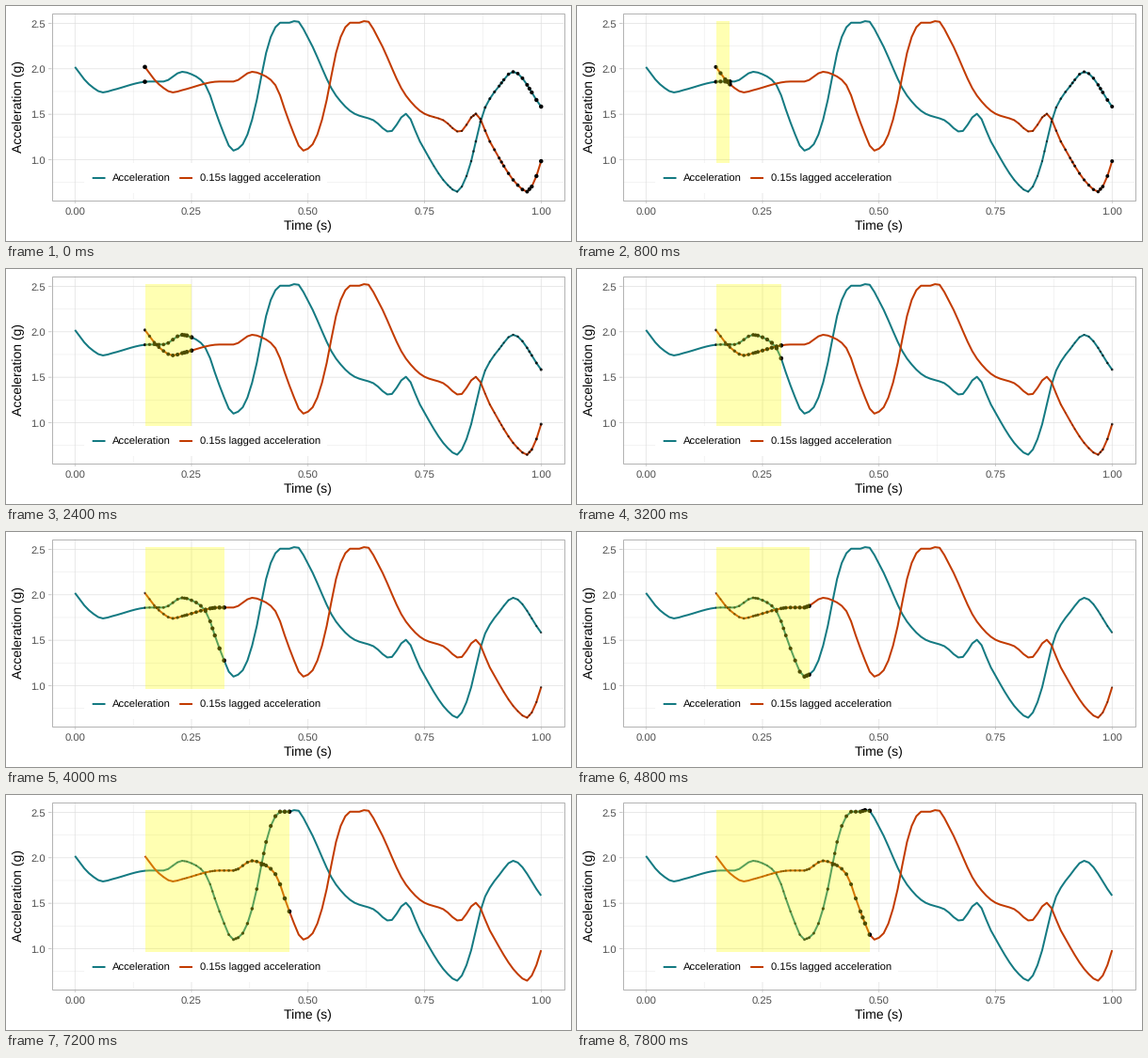
Write a matplotlib script that moves like this. It is 600 by 250 pixels and loops after 8000 ms.

```python
import numpy as np
import matplotlib.pyplot as plt
from matplotlib.animation import FuncAnimation
from matplotlib.patches import Rectangle

W, H, DPI = 600, 250, 100
PX = 72 / DPI
FRAMES, INTERVAL = 40, 200
LAG, WAKE = 0.15, 33
TEAL, ORANGE = "#147a82", "#c23b00"
GRID, EDGE, TICK = "#dedede", "#b3b3b3", "#4d4d4d"
LEFT, RIGHT, TOP, BOTTOM = 48.5, 592.5, 7.5, 206.5

plt.rcParams["font.family"] = "Liberation Sans"
plt.rcParams["text.hinting"] = "none"


def sx(t):
    return 73.25 + 495 * np.asarray(t)


def sy(g):
    return 163.5 - 96.7 * (np.asarray(g) - 1)


# Peaks, dips and bends of the acceleration: hundredths of a second, g
BENDS = [(0, 2.02), (3, 1.83), (6, 1.74), (8, 1.765), (16, 1.86), (19, 1.86),
         (23, 1.967), (26, 1.915), (28, 1.82), (31, 1.41), (34, 1.10),
         (36, 1.17), (38, 1.44), (42, 2.35), (44, 2.507), (46, 2.507),
         (47.5, 2.53), (50, 2.34), (56, 1.705), (60, 1.505), (64, 1.435),
         (67.5, 1.305), (71, 1.505), (74, 1.20), (80, 0.72), (82, 0.648),
         (84, 0.82), (88, 1.575), (91, 1.81), (94, 1.967), (100, 1.584)]


def smooth(x, points):
    """Cubic curve through the points that never overshoots them."""
    px, py = np.array(points).T
    h = np.diff(px)
    d = np.diff(py) / h
    turn = d[:-1] * d[1:] <= 0
    mean = 2 * d[:-1] * d[1:] / np.where(turn, 1, d[:-1] + d[1:])
    m = np.concatenate([d[:1], np.where(turn, 0, mean), d[-1:]])
    i = np.clip(np.searchsorted(px, x, side="right") - 1, 0, len(h) - 1)
    u = (x - px[i]) / h[i]
    ease = u * u * (3 - 2 * u)
    return (py[i] + (py[i + 1] - py[i]) * ease
            + h[i] * u * (1 - u) * (m[i] * (1 - u) - m[i + 1] * u))


time = np.arange(101) / 100
accel = smooth(np.arange(101.0), BENDS)

# Steps at which the head only moves half way to the next sample
HALVES = np.round(3.01 + 6.75 * np.arange(6))


def head(i):
    """Time at the moving head; negative steps are the end of the last pass."""
    if i < 0:
        return 1 + LAG - head(-1 - i)
    return LAG + (i - np.clip((i - HALVES + 1) / 2, 0, 1).sum()) / 100


fig = plt.figure(figsize=(W / DPI, H / DPI), dpi=DPI, facecolor="white")
ax = fig.add_axes([0, 0, 1, 1])
ax.set_xlim(0, W)
ax.set_ylim(H, 0)
ax.axis("off")


def line(x, y, color, width, z):
    ax.plot(x, y, color=color, lw=width * PX, zorder=z, snap=False,
            solid_capstyle="butt")


def label(x, y, text, size, color="black", ha="left", **kw):
    ax.text(x, y, text, fontsize=size * PX, color=color, ha=ha,
            va="baseline", zorder=8, **kw)


def box(x, y, w, h, z, **kw):
    return ax.add_patch(Rectangle((x, y), w, h, zorder=z, **kw))


# Grid, ticks and axis labels
for k in range(9):
    x, major = sx(k / 8), k % 2 == 0
    line([x, x], [TOP, BOTTOM], GRID, 0.68 if major else 0.34, 1)
    if major:
        line([x, x], [BOTTOM, BOTTOM + 3.5], EDGE, 0.68, 1)
        label(x, 222, f"{k / 8:.2f}", 11.2, TICK, "center")

for k in range(8):
    g = 0.75 + k / 4
    y, major = sy(g), k % 2 == 1
    line([LEFT, RIGHT], [y, y], GRID, 0.68 if major else 0.34, 1)
    if major:
        line([LEFT - 3.5, LEFT], [y, y], EDGE, 0.68, 1)
        label(42.2, y + 4, f"{g:.1f}", 11.2, TICK, "right")

label((LEFT + RIGHT) / 2, 238, "Time (s)", 14, ha="center")
label(17, (TOP + BOTTOM) / 2, "Acceleration (g)", 14, ha="center",
      rotation=90, rotation_mode="anchor")

# Curves, wake dots and highlighted band
line(sx(time), sy(accel), TEAL, 2, 2)
shown = time <= 1 - LAG + 1e-9
line(sx(time[shown] + LAG), sy(accel[shown]), ORANGE, 2, 2)

dots = ax.scatter([], [], linewidths=0, zorder=3)
band = box(sx(LAG), sy(accel.max()), 0, np.ptp(sy(accel)), 4,
           fc="yellow", alpha=0.3, lw=0, antialiased=False)

# Legend and panel border
box(83, 167.4, 258, 31.3, 5, fc="white", lw=0, antialiased=False)
for x, color, text in [(91.7, TEAL, "Acceleration"),
                       (184.2, ORANGE, "0.15s lagged acceleration")]:
    line([x, x + 13.8], [183, 183], color, 2, 6)
    label(x + 21.3, 187, text, 11.2)

box(LEFT, TOP, RIGHT - LEFT, BOTTOM - TOP, 7, fill=False, ec=EDGE, lw=PX,
    snap=True)


def draw(i):
    age = np.arange(WAKE - 1, -1, -1)
    t = np.array([head(i - a) for a in age])
    g = np.concatenate([np.interp(t, time, accel),
                        np.interp(t - LAG, time, accel)])
    fade = age / WAKE
    radius = 0.7 + 1.6 * (1 - fade) ** 1.3
    rgba = np.zeros((2 * WAKE, 4))
    rgba[:, 3] = np.tile(1 - fade**2, 2)
    dots.set_offsets(np.column_stack([sx(np.tile(t, 2)), sy(g)]))
    dots.set_sizes(np.tile((2 * radius * PX) ** 2, 2))
    dots.set_facecolors(rgba)
    band.set_width(sx(t[-1]) - sx(LAG))
    return dots, band


anim = FuncAnimation(fig, draw, frames=FRAMES, interval=INTERVAL,
                     init_func=lambda: draw(0), repeat=True, repeat_delay=0)
plt.show()
```
